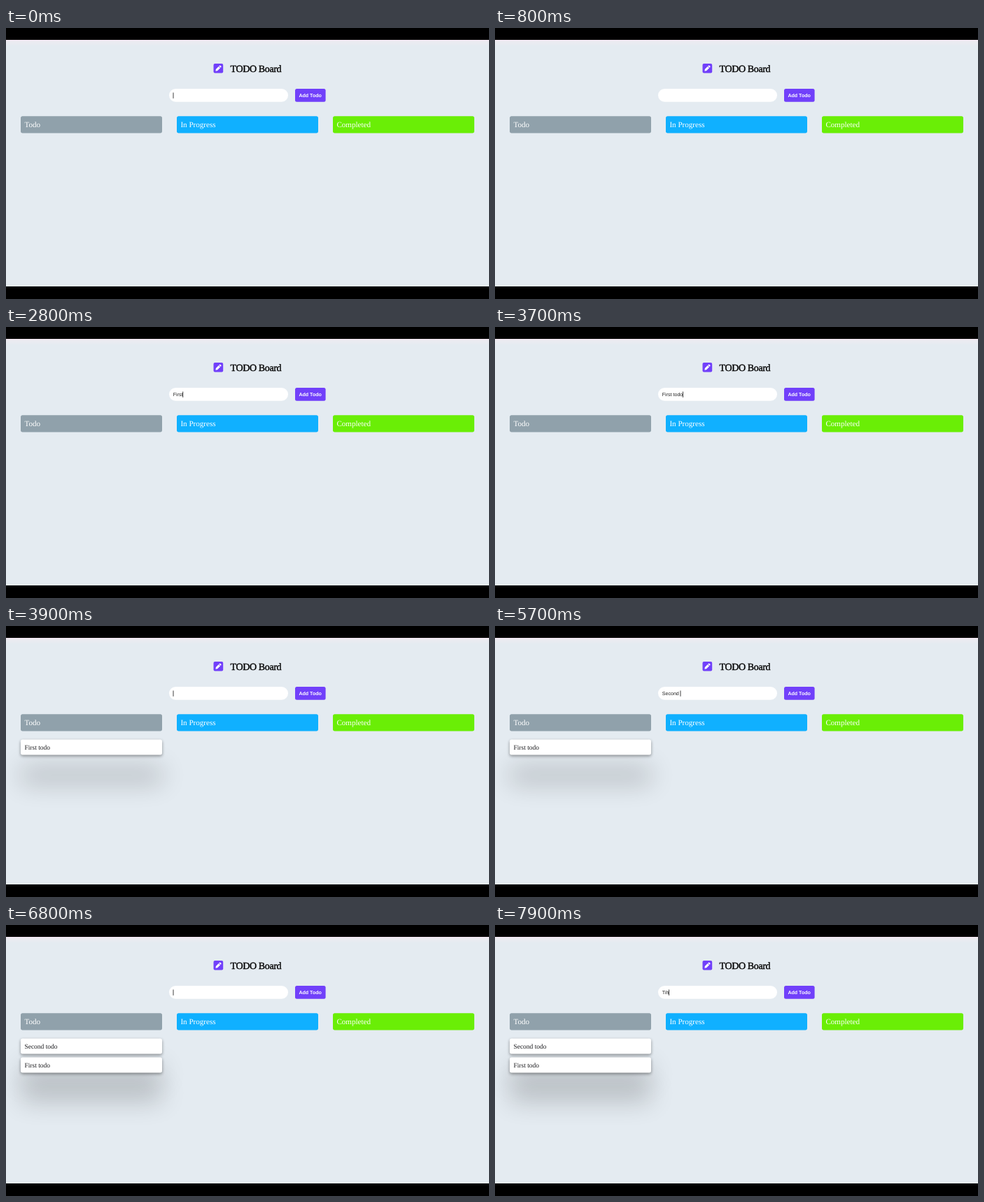
Write an HTML page that moves like this. It is 690 px wide and 388 px high and loops after 8000 ms.

```html
<!DOCTYPE html>
<html lang="en">
<head>
<meta charset="utf-8">
<title>Todo board</title>
<style>
  html, body { margin: 0; width: 100%; height: 100%; overflow: hidden; background: #000; }
  svg { display: block; width: 690px; height: 388px; }
  text { font-family: "Liberation Serif", serif; text-rendering: geometricPrecision; white-space: pre; }
  .title { font-size: 14px; letter-spacing: -.36px; stroke: #000; stroke-width: .35px; }
  .column { font-size: 11.1px; fill: #fff; }
  .card text { font-size: 9.5px; fill: #1c1c1f; }
  .ui { font: 7.08px "Liberation Sans", sans-serif; }
  .far { filter: blur(18px); opacity: .22; }
  .near { filter: blur(2px); opacity: .4; }
</style>
</head>
<body>
<svg viewBox="0 0 690 388">
  <defs>
    <linearGradient id="top" x2="0" y2="1">
      <stop offset="0" stop-color="#f5e6f4"/>
      <stop offset=".25" stop-color="#ecebf1"/>
      <stop offset="1" stop-color="#e4ebf1"/>
    </linearGradient>
  </defs>
  <rect y="17" width="690" height="353" fill="#e4ebf1"/>
  <rect y="17" width="690" height="9" fill="url(#top)"/>

  <rect x="296.5" y="51" width="13.7" height="13.6" rx="2" fill="#7140fa"/>
  <g transform="translate(303.2 57.9) rotate(-45)" fill="#fff">
    <path d="M-5.3 0L-3.2-1.6H2.5V1.6H-3.2Z"/>
    <path d="M3.1-1.6H4.3Q5.1-1.6 5.1-.8V.8Q5.1 1.6 4.3 1.6H3.1Z"/>
  </g>
  <text class="title" x="320.5" y="62.8">TODO Board</text>

  <rect x="233" y="87" width="170" height="18.7" rx="9.3" fill="#fff"/>
  <text id="entry" class="ui" x="238.8" y="99" fill="#222"></text>
  <rect id="caret" y="92.5" width=".8" height="8.3" fill="#111"/>
  <rect x="413" y="87" width="43.6" height="18.7" rx="2.5" fill="#7140fa"/>
  <text class="ui" x="418.4" y="98.9" fill="#fff" font-weight="700" style="font-weight:700">Add Todo</text>

  <g id="columns"></g>
  <g id="cards"></g>
</svg>
<script>
const LOOP = 8000, BLINK = 500;
const $ = id => document.getElementById(id);

// Each entry: text, key times, submit time.
const entries = [
  { text: "First todo", keys: [1200, 2200, 2400, 2600, 2800, 2900, 3100, 3300, 3500, 3700], submit: 3900 },
  { text: "Second todo", keys: [4400, 4700, 4900, 5100, 5300, 5400, 5700, 6000, 6200, 6400, 6500], submit: 6800 },
  { text: "Tih", keys: [7300, 7700, 7900], submit: LOOP }
];
const events = [-100, ...entries.flatMap(e => [...e.keys, e.submit])];

$("columns").innerHTML = [["Todo", "#90a1ab"], ["In Progress", "#10b0ff"], ["Completed", "#6aee06"]]
  .map(([name, color], i) => {
    const x = 21 + i * 223;
    return `<rect x="${x}" y="126.3" width="202" height="24.2" rx="2.7" fill="${color}"/>
      <text class="column" x="${x + 5.4}" y="142.2">${name}</text>`;
  }).join("");

function card(text, i) {
  const box = (dy, attrs) => `<rect x="21" y="${162.5 + dy}" width="202" height="22" rx="2.7" ${attrs}/>`;
  return `<g class="card" transform="translate(0 ${i * 27})">
    ${box(40, 'class="far"')}${box(1.8, 'class="near"')}${box(0, 'fill="#fff"')}
    <text x="26.4" y="176.8">${text}</text></g>`;
}

let shown = 0;
function draw(now) {
  const t = now % LOOP;
  const done = entries.filter(e => t >= e.submit);
  const current = entries[done.length];
  $("entry").textContent = current.text.slice(0, current.keys.filter(k => t >= k).length);

  const lastEvent = events.filter(e => e <= t).pop();
  const visible = (t - lastEvent) % (2 * BLINK) < BLINK;
  $("caret").setAttribute("x", 238.6 + $("entry").getComputedTextLength());
  $("caret").setAttribute("opacity", visible ? 1 : 0);

  if (done.length !== shown) {
    shown = done.length;
    $("cards").innerHTML = done.map(e => e.text).reverse().map(card).join("");
  }
  requestAnimationFrame(draw);
}
const start = performance.now();
const frame = draw;
draw(0);
</script>
</body>
</html>
```
